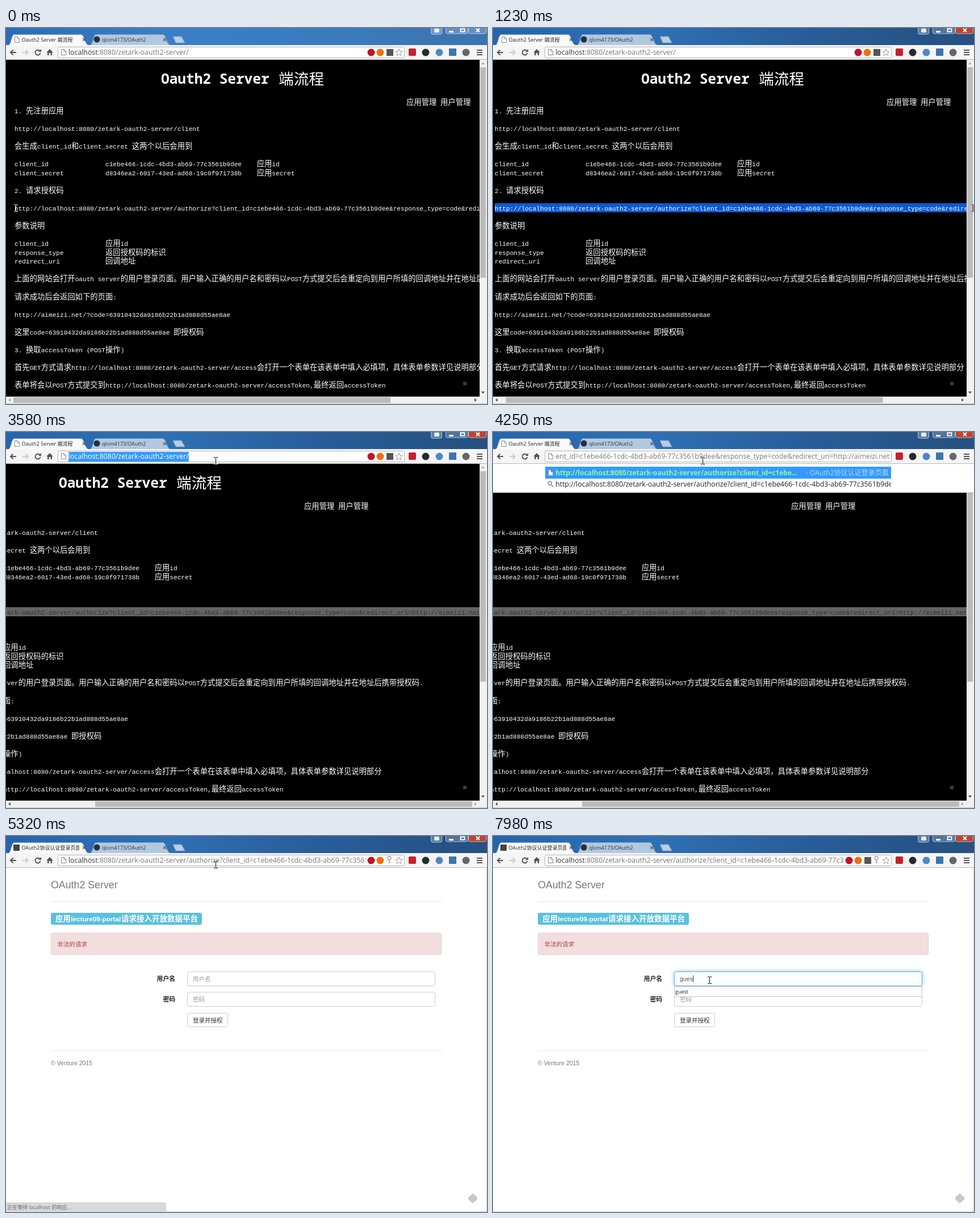
An HTML page with a canvas for the animation above (8000 ms loop, 847x661 px).

```html
<!DOCTYPE html>
<html lang="zh">
<head>
<meta charset="utf-8">
<title>OAuth2 walkthrough</title>
<style>
html, body { margin: 0; width: 100%; height: 100%; overflow: hidden; background: #fff; }
canvas { display: block; }
</style>
</head>
<body>
<canvas id="stage" width="847" height="661"></canvas>
<script>
const ctx = document.getElementById('stage').getContext('2d');
const LOOP = 8000;
const CJK = '"Noto Sans CJK SC", "Noto Sans CJK", sans-serif';
const ui = (px, weight = '') => `${weight} ${px}px "Open Sans", ${CJK}`;
const web = (px, weight = '') => `${weight} ${px}px "Liberation Sans", ${CJK}`;

const HOST = 'localhost';
const BASE = ':8080/zetark-oauth2-server/';
const SITE = 'http://' + HOST + BASE;
const QUERY = 'authorize?client_id=c1ebe466-1cdc-4bd3-ab69-77c3561b9dee' +
  '&response_type=code&redirect_uri=http://aimeizi.net';
const LOGIN_TITLE = 'OAuth2协议认证登录页面';
const USER = 'guest';

const CELL = 20 / 3; // half-width character of the guide page
const URL_ROW = 11;
const row = (a, b, c = '') => a.padEnd(24) + (c ? b.padEnd(40) + c : b);
const GUIDE = {
  0: '1. 先注册应用',
  2: SITE + 'client',
  4: '会生成client_id和client_secret 这两个以后会用到',
  6: row('client_id', 'c1ebe466-1cdc-4bd3-ab69-77c3561b9dee', '应用id'),
  7: row('client_secret', 'd8346ea2-6017-43ed-ad68-19c0f971738b', '应用secret'),
  9: '2. 请求授权码',
  [URL_ROW]: SITE + QUERY,
  13: '参数说明',
  15: row('client_id', '应用id'),
  16: row('response_type', '返回授权码的标识'),
  17: row('redirect_uri', '回调地址'),
  19: '上面的网站会打开oauth server的用户登录页面。用户输入正确的用户名和密码以POST方式提交后会重定向到用户所填的回调地址并在地址后携带授权码.',
  21: '请求成功后会返回如下的页面:',
  23: 'http://aimeizi.net/?code=63910432da9186b22b1ad888d55ae8ae',
  25: '这里code=63910432da9186b22b1ad888d55ae8ae 即授权码',
  27: '3. 换取accessToken (POST操作)',
  29: `首先GET方式请求${SITE}access会打开一个表单在该表单中填入必填项，具体表单参数详见说明部分`,
  31: `表单将会以POST方式提交到${SITE}accessToken,最终返回accessToken`
};

// The picture only changes at these moments: [first, last, count]
const BURSTS = [[120, 1110, 8], [1230, 1500, 3], [2050, 3030, 8], [3150, 3820, 6],
  [4250, 4250, 1], [4680, 5190, 5], [5320, 5460, 2], [5700, 5700, 1],
  [5850, 6660, 7], [6910, 6910, 1], [7470, 7590, 2], [7860, 7980, 2]];
const POINTER = [[0, 17, 316], [1110, 841, 316], [1230, 845, 316], [1910, 845, 316],
  [2330, 419, 416], [2600, 230, 330], [3030, 207, 214], [3150, 240, 180],
  [3418, 369, 50], [5560, 369, 50], [5700, 350, 100], [5985, 306, 165],
  [6390, 381, 253], [LOOP, 381, 253]];

function snap(t) {
  let shown = 0;
  for (const [first, last, count] of BURSTS) {
    if (t < first) break;
    const gap = (last - first) / (count - 1) || 1;
    shown = first + Math.min(count - 1, Math.floor((t - first) / gap + 1e-6)) * gap;
  }
  return shown;
}

function pointerAt(t) {
  const i = POINTER.findIndex(k => k[0] > t);
  const [t0, x0, y0] = POINTER[i - 1], [t1, x1, y1] = POINTER[i];
  const u = (t - t0) / (t1 - t0);
  return [Math.round(x0 + (x1 - x0) * u), Math.round(y0 + (y1 - y0) * u)];
}

function rect(x, y, w, h, color) {
  ctx.fillStyle = color;
  ctx.fillRect(x, y, w, h);
}
function box(x, y, w, h, r, fill, stroke) {
  ctx.beginPath();
  ctx.roundRect(x, y, w, h, r);
  if (fill) { ctx.fillStyle = fill; ctx.fill(); }
  if (stroke) { ctx.lineWidth = 1; ctx.strokeStyle = stroke; ctx.stroke(); }
}
function dot(x, y, r, color) {
  ctx.beginPath();
  ctx.arc(x, y, r, 0, 7);
  ctx.fillStyle = color;
  ctx.fill();
}
function shape(d, x, y, { fill, stroke, width = 1 }) {
  ctx.save();
  ctx.translate(x, y);
  const path = new Path2D(d);
  if (fill) { ctx.fillStyle = fill; ctx.fill(path); }
  if (stroke) { ctx.strokeStyle = stroke; ctx.lineWidth = width; ctx.stroke(path); }
  ctx.restore();
}
function text(str, x, y, font, color, align = 'left') {
  ctx.font = font;
  ctx.textAlign = align;
  ctx.fillStyle = color;
  ctx.fillText(str, x, y);
  return x + ctx.measureText(str).width;
}
function clipped(x, y, w, h, draw) {
  ctx.save();
  ctx.beginPath();
  ctx.rect(x, y, w, h);
  ctx.clip();
  draw();
  ctx.restore();
}
function gradient(x1, y1, ...colors) {
  const g = ctx.createLinearGradient(0, 0, x1, y1);
  colors.forEach((c, i) => g.addColorStop(i / (colors.length - 1), c));
  return g;
}

// Latin takes one cell per character, Chinese two
function cells(str, x, y, color) {
  for (const run of str.match(/[^\x00-\xff]+|[\x00-\xff]+/g)) {
    const wide = run.charCodeAt(0) > 255;
    text(run, x, y, wide ? `${CELL * 2}px ${CJK}` : `${CELL / 0.6}px "Liberation Mono", monospace`, color);
    x += run.length * CELL * (wide ? 2 : 1);
  }
}

function titleBar(t) {
  const active = t >= 120, login = t >= 5320, loading = t >= 4680 && !login;
  rect(0, 0, 847, 30, active ? gradient(847, 0, '#2465ae', '#2f70b4', '#285c98', '#26507f')
    : gradient(847, 0, '#2a6cb8', '#3a7fc6', '#3a7bbe', '#3c74ae'));
  box(748.5, -5, 19, 16, 3, 'rgba(255,255,255,.25)', 'rgba(220,235,250,.7)');
  box(754, 1, 9, 7, 2, '#e4edf5');
  box(774.5, -5, 39, 15, 3, 'rgba(255,255,255,.2)', 'rgba(220,235,250,.7)');
  box(814.5, -5, 31, 15, 3, active ? '#c0432f' : 'rgba(255,255,255,.2)', 'rgba(220,235,250,.7)');
  rect(780, 5, 8, 3, '#fff');
  shape('M0 0h7v5h-7z', 800.5, 1.5, { stroke: '#fff', width: 2 });
  shape('M0 0l6 6M6 0l-6 6', 828, 1, { stroke: '#fff', width: 2 });

  const tab = 'M0 19C5 18 5 2 10 0H129C134 2 135 18 142 19z';
  shape(tab, 148, 11.5, { fill: '#b1c8e0', stroke: '#7d9dc0' });
  shape('M2 0H17L23 11H7z', 292, 15, { fill: '#b8cde4', stroke: '#7d9dc0' });
  shape(tab, 4, 11.5, { fill: '#fbfbfb', stroke: '#7d9dc0' });
  if (login) rect(13, 15, 11, 11, '#444');
  else if (loading) {
    const a = t / 160;
    ctx.beginPath();
    ctx.arc(18, 20, 5, a, a + 2);
    ctx.lineWidth = 1.5;
    ctx.strokeStyle = '#c3cad2';
    ctx.stroke();
  } else pageIcon(15, 15);
  clipped(27, 12, 102, 17, () =>
    text(login ? LOGIN_TITLE : 'Oauth2 Server 端流程', 27.5, 24, ui(9), '#222'));
  dot(160, 20, 5.5, '#24303c');
  text('qlom4173/OAuth2', 169, 24, ui(9), '#333');
  for (const x of [135, 277]) shape('M0 0l5 5M5 0l-5 5', x, 18, { stroke: '#555', width: 1.2 });
}

function pageIcon(x, y) {
  shape('M.5 .5H5L8.5 4V10.5H.5zM5 .5V4H8.5', x, y, { fill: '#fff', stroke: '#888' });
}

function addressText(t) {
  const y = 47, font = ui(12.3), grey = '#777';
  if (t >= 4250 && t < 4680) {
    clipped(110, 34, 590, 19, () => text(SITE + QUERY, 698, y, font, grey, 'right'));
    return;
  }
  const path = BASE + (t >= 4680 ? QUERY : '');
  clipped(109, 34, (t >= 5460 ? 618 : 635) - 109, 19, () => {
    const picked = t >= 3552 && t < 4250;
    ctx.font = font;
    if (picked) rect(110, 35, ctx.measureText(HOST + path).width, 17, '#3399ff');
    const x = text(HOST, 110, y, font, picked ? '#fff' : '#333');
    text(path, x, y, font, picked ? '#fff' : grey);
  });
}

function toolbar(t) {
  const login = t >= 5320, loading = t >= 4680 && !login, pasted = t >= 4250 && t < 4680;
  rect(0, 30, 847, 26, '#f5f5f5');
  rect(0, 55, 847, 1, '#b8b8b8');
  const back = 'M11 5H1M5.5 .5L1 5L5.5 9.5';
  shape(back, 7, 38, { stroke: '#555', width: 2 });
  shape('M0 5H10M5.5 .5L10 5L5.5 9.5', 29, 38, { stroke: '#ccc', width: 2 });
  if (loading) shape('M0 0l8 8M8 0l-8 8', 52, 39, { stroke: '#555', width: 2.2 });
  else {
    shape('M8.5 2A4.5 4.5 0 1 0 9.5 6', 51, 38, { stroke: '#555', width: 2 });
    shape('M11 0V5H6z', 51, 37, { fill: '#555' });
  }
  shape('M6 0L12 6H10V11H7.5V7H4.500V11H2V6H0z', 71, 37, { fill: '#555' });
  box(91.5, 33.5, 610, 19, 2, '#fff', '#b4b4b4');
  pageIcon(97, 37);
  addressText(t);

  if (!pasted) {
    const shift = t >= 5460 ? -16 : 0;
    dot(643 + shift, 43, 6.5, '#c11226');
    dot(659 + shift, 43, 6.5, '#ee7012');
    if (!login || shift) rect(670 + shift, 37, 12, 12, '#555');
    if (login) {
      shape('M-3 -3a3 3 0 1 1 6 0a3 3 0 1 1 -6 0M0 0V6M0 4H2', 675, 42, { stroke: '#999', width: 1.3 });
    }
    shape('M0 -6L1.800 -2L6 -1.600L2.800 1.300L3.800 5.500L0 3.300L-3.800 5.500L-2.800 1.300L-6 -1.600L-1.800 -2z',
      692, 43, { stroke: '#999' });
  }
  box(709, 36, 13, 13, 2, '#c8202c');
  dot(739, 43, 6.5, '#252a2c');
  dot(763, 43, 6.5, '#4f86c6');
  box(780, 36, 13, 13, 1, '#3c76ad');
  dot(810, 43, 6.5, '#666');
  for (const y of [38, 42, 46]) rect(829, y, 10, 2, '#555');
}

function guidePage(t) {
  const scroll = t < 1230 ? 0 : t < 1350 ? 12 : t < 1490 ? 96 : 180;
  const left = 15 - scroll;
  const blurred = t >= 3552 && t < 4680;
  rect(0, 56, 847, 605, '#f1f1f1');
  rect(0, 56, 834, 592, '#000');
  clipped(0, 56, 834, 592, () => {
    text('Oauth2 Server', 273 - scroll, 98, `bold ${CELL * 2.2 / 0.6}px "Noto Sans Mono", monospace`, '#fff');
    text('端流程', 480 - scroll, 99, `${CELL * 4}px ${CJK}`, '#fff');
    cells('应用管理 用户管理', 705 - scroll, 135, '#fff');
    const total = GUIDE[URL_ROW].length;
    const count = t < 1230 ? Math.max(0, Math.round((pointerAt(t)[0] - 17) / CELL)) : total;
    rect(left, 308, count * CELL, 16, blurred ? '#646464' : '#0a5ad2');
    for (const [n, line] of Object.entries(GUIDE)) {
      cells(line, left, 150 + n * 15.55, blurred && n == URL_ROW ? '#323232' : '#fff');
    }
    rect(805, 622, 6, 6, '#3c3c3c');
  });

  const thumb = '#bbb';
  rect(835, 69, 10, 370, thumb);
  shape('M0 4L3 0L6 4z', 837, 60, { fill: '#aaa' });
  shape('M0 0L3 4L6 0z', 837, 639, { fill: '#555' });
  rect(13 + scroll * 0.8, 649, 664, 10, thumb);
  shape('M4 0L0 3L4 6z', 4, 651, { fill: scroll ? '#555' : '#aaa' });
  shape('M0 0L4 3L0 6z', 825, 651, { fill: scroll < 180 ? '#555' : '#aaa' });
  rect(0, 660, 847, 1, '#c4c4c4');
  if (t >= 4250 && t < 4680) suggestions();
}

function suggestions() {
  rect(0, 56, 847, 51, '#fff');
  rect(0, 106, 847, 1, '#b8b8b8');
  rect(92, 61, 609, 21, '#3399ff');
  pageIcon(97, 66);
  text(SITE + 'authorize?client_id=c1ebe...', 110, 76, ui(12, 'bold'), '#8dff8d');
  text('- ' + LOGIN_TITLE, 551, 76, ui(12), '#b5dbff');
  shape('M6 3a3 3 0 1 1 -6 0a3 3 0 1 1 6 0M5 5L9 9', 97, 87, { stroke: '#888', width: 1.5 });
  clipped(100, 82, 601, 22, () => text(SITE + QUERY, 110, 96, ui(12.3), '#222'));
}

function loginPage(t) {
  const focused = t >= 6390;
  const typed = USER.slice(0, [7470, 7590, 7860, 7980].filter(k => t >= k - 1).length);
  rect(0, 56, 847, 605, '#fff');
  rect(846, 56, 1, 605, '#ccc');
  rect(0, 660, 847, 1, '#ccc');
  text('OAuth2 Server', 79, 92, web(17.8), '#777');
  rect(79, 115, 688, 1, '#e5e5e5');

  box(79, 135, 266, 21, 3, '#5bc0de');
  text('应用', 87, 150, web(13.5, 'bold'), '#fff');
  text('lecture09-portal', 114.5, 150, web(11.7, 'bold'), '#fff');
  text('请求接入开放数据平台', 203, 150, web(13.5, 'bold'), '#fff');

  box(79.5, 170.5, 687, 38, 3, '#f2dede', '#ebccd1');
  text('非法的请求', 90.5, 193.5, web(10.5), '#a94442');

  text('用户名', 298, 255, web(10.8, 'bold'), '#222', 'right');
  text('密码', 298, 291, web(10.8, 'bold'), '#222', 'right');
  ctx.save();
  if (focused) {
    ctx.shadowColor = 'rgba(102,175,233,.7)';
    ctx.shadowBlur = 6 * Math.min(1, (t - 6300) / 200);
  }
  box(319.5, 238.5, 436, 25, 3, '#fff', focused ? '#66afe9' : '#ccc');
  ctx.restore();
  box(319.5, 274.5, 436, 25, 3, '#fff', '#ccc');
  text('密码', 329, 291, web(10.5), '#999');
  let caret = 329;
  if (typed) caret = text(typed, 329, 255, web(10.5), '#555');
  else text('用户名', 329, 255, web(10.5), '#999');
  if (typed || (focused && t < 6910)) rect(Math.round(caret), 245, 1, 12, '#333');
  if (typed) {
    box(319.5, 264.5, 436, 18, 0, '#fff', '#c4c4c4');
    text(USER, 321, 277, ui(9), '#222');
  }

  box(319.5, 311.5, 71, 24, 3, '#fff', '#ccc');
  text('登录并授权', 329, 327.5, web(10.5), '#333');
  rect(79, 377, 688, 1, '#e5e5e5');
  text('© Venture 2015', 79, 403, web(10.5), '#777');
  ctx.save();
  ctx.translate(822, 637);
  ctx.rotate(Math.PI / 4);
  box(-6.5, -6.5, 13, 13, 2, '#c8c8c8');
  ctx.restore();
}

function statusBubble() {
  box(-3, 645, 284, 20, 3, '#d9d9d9', '#c0c0c0');
  text('正在等待 localhost 的响应...', 2, 656, ui(9), '#666');
}

function pointer(t) {
  const [x, y] = pointerAt(t);
  const arrow = (t >= 2050 && t < 3284) || (t >= 5700 && t < 6255);
  if (arrow) {
    shape('M.5 0V11L3 8.500L5 12.500L6.500 12L4.800 8H8z', x, y, { fill: '#fff', stroke: '#000' });
    return;
  }
  ctx.save();
  ctx.globalCompositeOperation = 'difference';
  shape('M-3 -5.500H0M1 -5.500H4M.5 -5V6M-3 6.500H0M1 6.500H4', x, y, { stroke: '#fff' });
  ctx.restore();
}

function draw(now) {
  const t = snap(now % LOOP);
  titleBar(t);
  toolbar(t);
  (t >= 5320 ? loginPage : guidePage)(t);
  if (t >= 4800 && t < 5700) statusBubble();
  pointer(t);
  requestAnimationFrame(draw);
}
requestAnimationFrame(draw);
</script>
</body>
</html>
```
